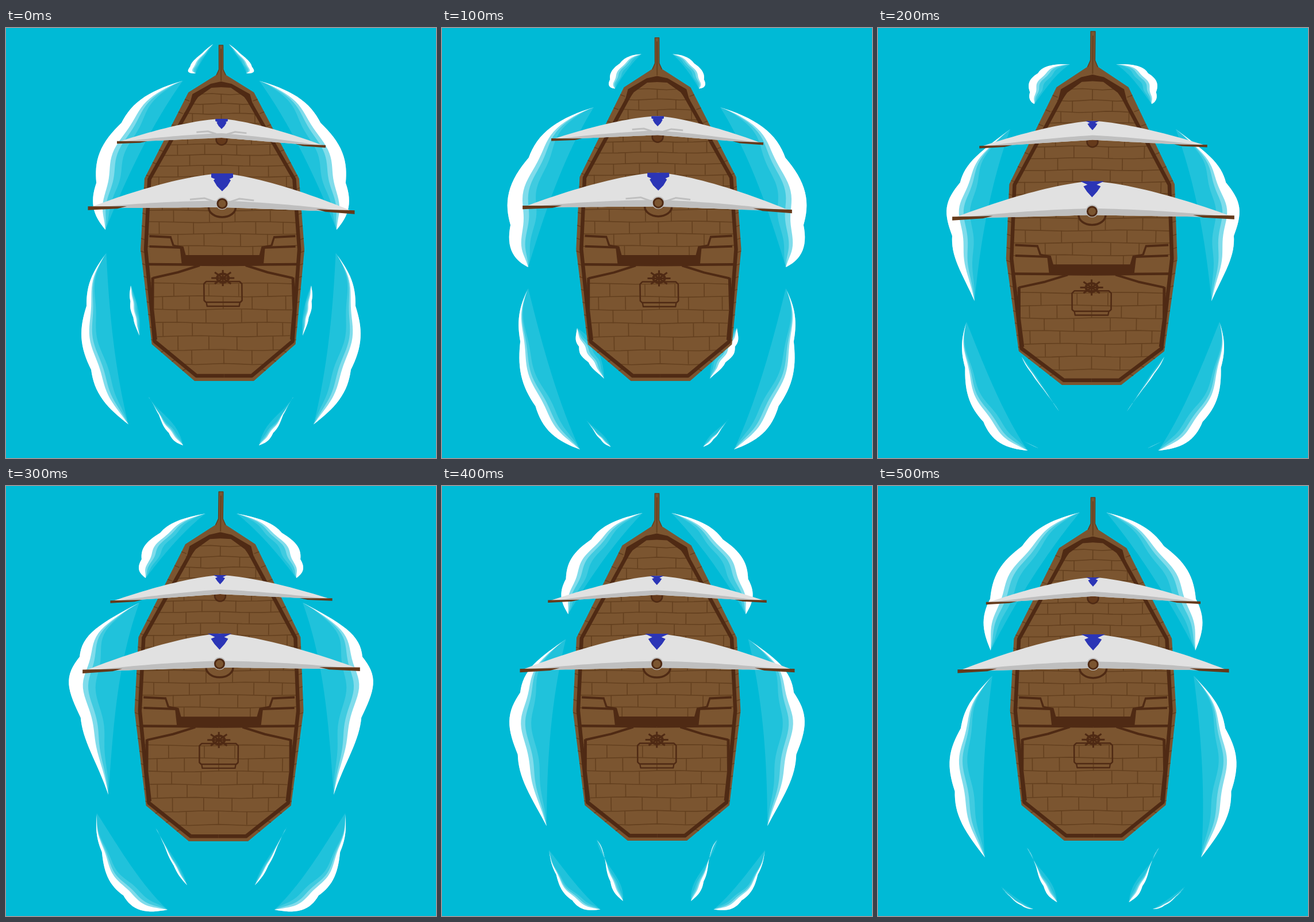
Recreate the animation shown at these times as an HTML page with a canvas. Size 748 by 748 pixels, loop 0.6 s.

```html
<!DOCTYPE html>
<html lang="en">
<head>
<meta charset="utf-8">
<title>Sailing ship</title>
<style>
html, body { margin: 0; height: 100%; overflow: hidden; background: #00bad6; }
canvas { display: block; width: 100vw; height: 100vh; }
</style>
</head>
<body>
<canvas id="c" width="748" height="748"></canvas>
<script>
const g = document.getElementById('c').getContext('2d');
const WATER = '#00bad6', WOOD = '#7b5530', DARK = '#4f2a14', SEAM = '#64401f', YARD = '#653a1b';
const CLOTH = '#e1e1e1', SHADE = '#bfbfbf', BLUE = '#2b35b6';
const FOAM = ['#20c2db', '#40cbe0', '#80dceb', '#ffffff'], REACH = [1, .8, .58, .42];
const STEP = 100, POSES = 6;

// Rocking of the ship, one entry per pose
const ROCK = {
  heave: [0, 0, 7, 4, 3, 3],
  arch: [0, 8, 58, 24, 25, 21],
  bow: [0, -13, -24, -20, -17, -10],
  sway: [0, .5, -8, -10, -5, -4],
  grow: [0, .02, .115, .08, .06, .035],
  tilt: [7, 7, -2, -4, 0, -1]
};

// A crest drifts astern as it ages: age, then four points along its outer edge
const SIDE = { last: 17, bow: .12, keys: [
  [0, 360,28, 340,44, 318,68, 330,79],
  [2, 334,63, 274,78, 261,112, 272,132],
  [3, 347,48, 263,81, 231,128, 243,160],
  [5, 351,46, 245,102, 189,195, 196,286],
  [7, 264,138, 142,225, 111,345, 150,416],
  [8, 230,176, 135,268, 122,360, 168,475],
  [9, 232,203, 118,295, 122,400, 178,537],
  [11, 199,330, 138,420, 127,530, 186,646],
  [13, 150,453, 131,545, 157,660, 240,733],
  [15, 158,569, 163,638, 200,716, 281,737],
  [17, 214,697, 230,715, 249,730, 270,736]
] };
const STERN = { last: 8, bow: -.8, keys: [
  [0, 217,448, 215,475, 220,503, 232,535],
  [1, 235,522, 235,555, 252,582, 282,610],
  [2, 250,572, 266,600, 290,632, 315,667],
  [4, 269,615, 283,648, 291,688, 315,722],
  [6, 248,642, 265,673, 282,706, 308,726],
  [8, 248,716, 258,721, 268,726, 279,731]
] };

const mix = (a, b, k) => a + (b - a) * k;
const mix2 = (p, q, k) => [mix(p[0], q[0], k), mix(p[1], q[1], k)];
const points = s => s.split(' ').map(p => p.split(',').map(Number));
const range = (n, f) => Array.from({ length: n + 1 }, (_, i) => f(i / n));

function paint(fill, stroke, width) {
  if (fill) { g.fillStyle = fill; g.fill(); }
  if (stroke) { g.strokeStyle = stroke; g.lineWidth = width; g.stroke(); }
}

function poly(pts, fill, stroke, width) {
  g.beginPath();
  pts.forEach(p => g.lineTo(...p));
  if (fill) g.closePath();
  paint(fill, stroke, width);
}

function oval(x, y, rx, ry, fill, stroke, width, end = 7) {
  g.beginPath();
  g.ellipse(x, y, rx, ry, 0, 0, end);
  paint(fill, stroke, width);
}

// Cubic through four evenly spaced points
function through(p, t) {
  const s = t * 3, a = s - 1, b = s - 2, c = s - 3;
  const w = [-a * b * c / 6, s * b * c / 2, -s * a * c / 2, s * a * b / 6];
  return [0, 1].map(j => w.reduce((sum, k, i) => sum + k * p[i][j], 0));
}

function crest({ last, bow, keys }, age) {
  const i = keys.findIndex(k => k[0] >= age), b = keys[i], a = keys[i - 1] || b;
  const k = a === b ? 0 : (age - a[0]) / (b[0] - a[0]);
  const key = a.map((v, j) => mix(v, b[j], k));
  const p = [1, 3, 5, 7].map(j => [key[j], key[j + 1]]);

  const across = (t, f) => {
    const outer = through(p, t), chord = mix2(p[0], p[3], t);
    return mix2(outer, mix2(chord, outer, bow), f);
  };
  const outer = range(48, t => across(t, .12 * (1 - Math.abs(Math.sin(3 * Math.PI * t)))));
  FOAM.forEach((color, n) => {
    const edge = range(48, t => across(t, n ? REACH[n] * t ** (age / last) + .05 * Math.cos(6 * Math.PI * t) + .05 : 1));
    poly([...outer, ...edge.reverse()], color);
  });
}

function sea(pose) {
  for (const family of [SIDE, STERN])
    for (let age = pose; age <= family.last; age += POSES) crest(family, age);
}

// Maps an offset from the keel line and a height at rest to the rocking ship
function rocker(r) {
  return ([d, y]) => {
    const s = (614 - y) / 584, aft = Math.max(0, 1 - s);
    return [
      374 + 5.5 * aft ** 1.5 + r.sway * aft + d * (1 + r.grow * s),
      y + r.heave + r.arch * s + (r.bow - r.heave - r.arch) * s * s
    ];
  };
}

const HULL = points('3.5,30 3.5,72 9,82 57,112 134.5,262 142.5,385 125,550 51.5,614');

function beam(y) {
  const i = HULL.findIndex(p => p[1] >= y), [a, b] = [HULL[i - 1], HULL[i]];
  return mix(a[0], b[0], (y - a[1]) / (b[1] - a[1]));
}

function hull(warp) {
  const flip = pts => pts.map(([d, y]) => [-d, y]);
  const line = (pts, width, color = DARK) => poly(pts.map(warp), null, color, width);
  const whole = (pts, color) => poly([...pts, ...flip(pts).reverse()].map(warp), color);
  const pair = (s, width, color) => {
    const pts = points(s);
    line(pts, width, color);
    line(flip(pts), width, color);
  };

  whole(HULL, WOOD);
  pair('0,30 3.5,30 3.5,72 8,82', 1.5, SEAM);
  line([[0, 36], [0, 92]], 2, SEAM);

  // Joints in the rim
  for (let y = 124; y < 610; y += y < 550 ? 22 : 16)
    for (const side of [-1, 1])
      line([[side * beam(y), y], [side * (beam(y) - 8), y + (y < 550 ? 3 : -4)]], 1.5, SEAM);

  // Planks widen towards the stern
  for (let y = 115, row = 0; y < 600; row++) {
    const next = y + 15 + y / 60, half = beam(y) - 11, gap = 54;
    if (y < 395 || y > 430) {
      line(range(6, t => [mix(-half, half, t), y + Math.sin(t * 9 + y)]), 1.6, SEAM);
      for (let d = -gap * 2 + row % 2 * gap / 2; d < half - 8; d += gap) {
        const jog = d ? Math.sin(d + y) * 5 : 0;
        if (d > 8 - half && next < 600) line([[d + jog, y], [d + jog, next]], 1.6, SEAM);
      }
    }
    y = next;
  }

  // Inner rail
  pair('43,117 126,263 133.5,385 120,545 48,605 0,605', 6.5);
  whole(points('0,93 18,97 50,115 58,144 40,120 17,104 0,103'), DARK);
  pair('122,434 123,490 118,542', 5);

  // Cabin front and steps
  for (const side of [-1, 1])
    poly(points('126,363 90,363 85,380 73,382 73,411 126,411').map(([d, y]) => warp([d * side, y])), WOOD);
  whole(points('0,395 64,395 68,380 84,377 89,362 91,366 87,379 74,383 71,412 0,412'), DARK);
  pair('127,362 89,364', 4);
  pair('127,380 72,382', 4);
  pair('129,411 0,412', 4.5);
  pair('40,413 78,425 122,435', 4);

  // Chest and wheel
  pair('0,441 29,441 33,445 33,474 30,477 0,477', 2.5);
  pair('29,478 28,484 0,484', 2.3);
  const [x, y] = warp([0, 435]);
  for (let a = 0; a < 6; a += Math.PI / 4)
    poly([[x, y], [x + 20 * Math.cos(a), y + 14 * Math.sin(a)]], null, DARK, 3);
  oval(x, y, 10, 7.5, null, DARK, 4);
}

// Size of each sail at rest, its height above the yard and its drop below the mast
const FORE = { y: 202.5, span: 181.5, rise: 44.5, mast: 7.5, low: .26, stretch: .8, lean: .25, cx: 375, crest: .57 };
const MAIN = { y: 317, span: 232, rise: 64, mast: 12, low: .08, stretch: .5, lean: .45, cx: 376, crest: 1, big: true };

function sail(s, r, warp, folded) {
  const y = warp([0, s.y])[1], span = s.span * (1 + s.stretch * r.grow);
  const cx = s.cx + s.lean * r.sway, top = y - s.rise, mast = y - s.mast;
  const at = (u, v) => [mix(cx, 374.5 + span * u, Math.abs(u)) + (span * u) * (1 - Math.abs(u)), y + r.tilt * u / 2 - s.rise * v];
  const edge = f => range(48, t => at(t * 2 - 1, f(Math.abs(t * 2 - 1))));
  const foot = u => s.low * (1 - u);

  if (s.big) oval(cx, mast + 7, 23.5, 17, WOOD, DARK, 3.5, Math.PI);
  else oval(cx, mast - 1, 9.5, 9.5, YARD, DARK, 2.5);

  const hem = edge(foot).reverse();
  poly([...edge(u => 1 - u ** 1.45), ...hem], CLOTH);
  poly([...edge(u => foot(u) + .18 * (1 - u * u)), ...hem], SHADE);
  for (const side of [-1, 1]) {
    if (folded) poly([at(.05 * side, s.low + .14), at(.13 * side, s.low + .24), at(.24 * side, s.low + .2)], null, SHADE, 3);
    poly([at(side, .05), at(.8 * side, .06), at(.71 * side, .07), at(.78 * side, 0), at(side, -.05)], YARD);
  }

  // Pennant mark
  const mark = (s2, drop) => poly(points(s2).map(([dx, dy]) => [cx + dx * s.crest, top + (dy + drop) * s.crest]), BLUE);
  if (folded) mark('-19,0 19,0 19,7 12,10 -12,10 -19,7', 0);
  mark(folded ? '-6,0 6,0 15,8 9,18 0,27 -9,18 -15,8' : '-21,0 21,0 8,6 15,9 9,18 0,28 -9,18 -15,9 -8,6', folded ? 4 : 0);

  if (s.big) {
    oval(cx, mast, 11, 11, SHADE);
    oval(cx, mast + .5, 8, 8, WOOD, DARK, 3);
  }
}

function draw(now) {
  const pose = Math.floor(now / STEP) % POSES;
  const r = Object.fromEntries(Object.entries(ROCK).map(([name, v]) => [name, v[pose]]));
  const warp = rocker(r);
  g.fillStyle = WATER;
  g.fillRect(0, 0, 748, 748);
  sea(pose);
  g.setTransform(-1, 0, 0, 1, 748, 0);
  sea(pose);
  g.setTransform(1, 0, 0, 1, 0, 0);
  hull(warp);
  sail(FORE, r, warp, pose < 2);
  sail(MAIN, r, warp, pose < 2);
}

g.lineJoin = 'round';
let start;
function tick(now) {
  start ??= now;
  draw(now - start);
  requestAnimationFrame(tick);
}
draw(0);
requestAnimationFrame(tick);
</script>
</body>
</html>
```
